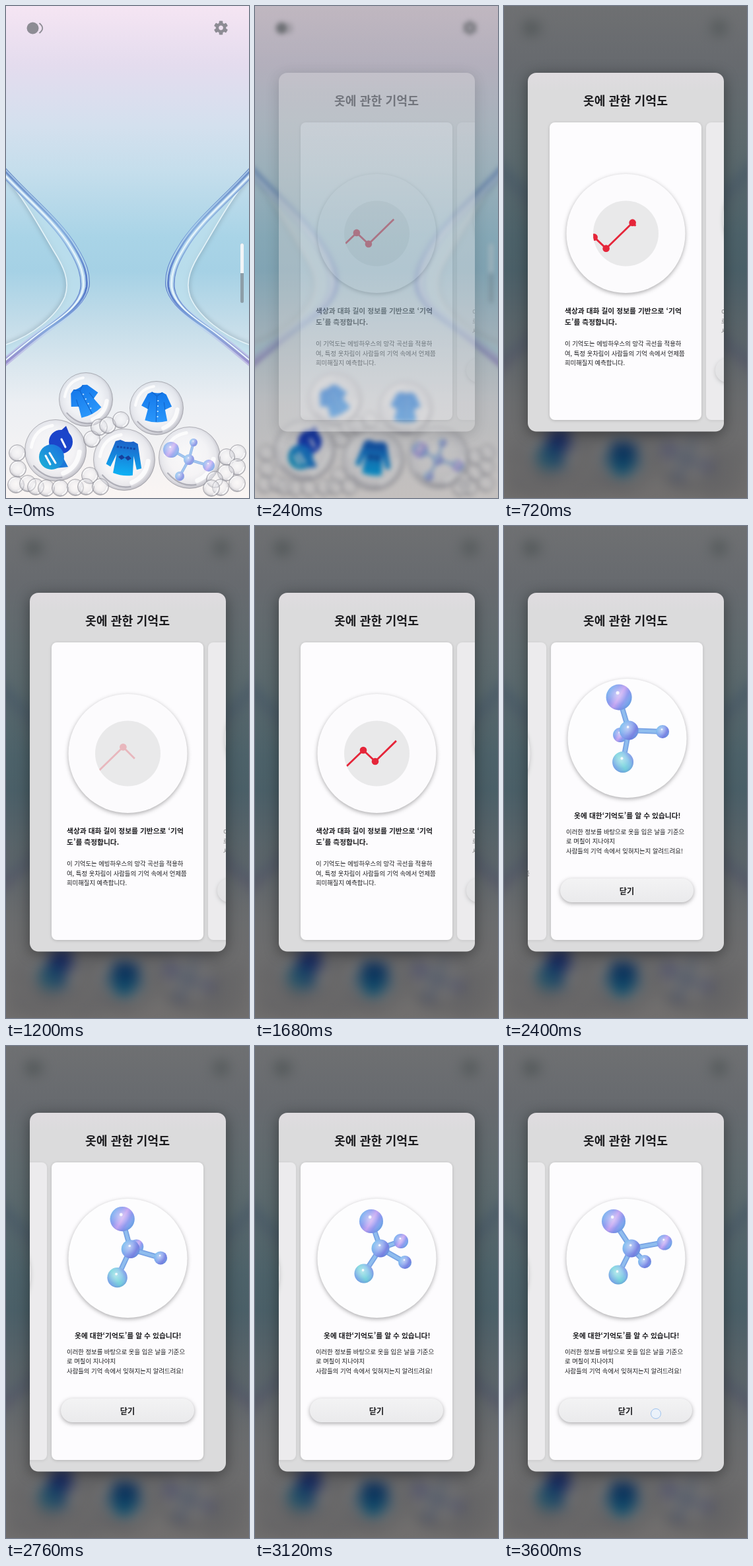
Write an HTML page that moves like this. It is 368 by 744 pixels and loops after 3.72 s.

```html
<!DOCTYPE html>
<html lang="ko">
<head>
<meta charset="utf-8">
<style>
html, body { margin: 0; width: 100%; height: 100%; overflow: hidden; }
#stage {
  position: relative; width: 368px; height: 744px; overflow: hidden;
  background: linear-gradient(#f5e5f3 0, #e4dcee 90px, #d4e0ee 180px, #c5deec 250px, #a9d4e7 350px,
    #a5d1e5 400px, #c2dce9 475px, #d9e6ee 540px, #eceff3 600px, #faf5f3 744px);
}
#stage > * { position: absolute; left: 0; top: 0; width: 368px; height: 744px; }
#scene { overflow: visible; }
#shade { background: linear-gradient(#001008, #000 60%); }
text { font-family: "Noto Sans CJK KR", "Noto Sans CJK", "Noto Sans KR", sans-serif; fill: #1b1b1e; }
.title { font-size: 18.3px; font-weight: 700; text-anchor: middle; }
.lead { font-size: 10.75px; font-weight: 700; }
.body { font-size: 9.35px; }
.btn { font-size: 12.2px; font-weight: 700; text-anchor: middle; }
.soft { filter: drop-shadow(0 1px 2px rgba(0,0,0,.18)); }
.raised { filter: drop-shadow(0 2px 3px rgba(0,0,0,.32)); }
.panel { filter: drop-shadow(0 4px 11px rgba(0,0,0,.4)); }
</style>
</head>
<body>
<div id="stage">
<svg id="scene" viewBox="0 0 368 744">
  <defs>
    <radialGradient id="bigBubble" cx=".48" cy=".47" r=".53">
      <stop offset="0" stop-color="#fff" stop-opacity=".5"/>
      <stop offset=".6" stop-color="#f4f4f8" stop-opacity=".5"/>
      <stop offset=".84" stop-color="#dfe0e7" stop-opacity=".6"/>
      <stop offset="1" stop-color="#aeaeb8" stop-opacity=".75"/>
    </radialGradient>
    <radialGradient id="smallBubble" cx=".5" cy=".45" r=".55">
      <stop offset="0" stop-color="#fff" stop-opacity=".35"/>
      <stop offset=".55" stop-color="#e9e9ee" stop-opacity=".4"/>
      <stop offset=".85" stop-color="#bdbdc5" stop-opacity=".5"/>
      <stop offset="1" stop-color="#84848e" stop-opacity=".6"/>
    </radialGradient>
    <linearGradient id="rim" x1="0" y1="246" x2="0" y2="545" gradientUnits="userSpaceOnUse">
      <stop offset="0" stop-color="#6d8fc8"/><stop offset=".3" stop-color="#86aede"/>
      <stop offset=".6" stop-color="#5577c8"/><stop offset=".8" stop-color="#86aadd"/>
      <stop offset="1" stop-color="#9a8bcb"/>
    </linearGradient>
    <linearGradient id="band" x1="0" y1="246" x2="0" y2="545" gradientUnits="userSpaceOnUse">
      <stop offset="0" stop-color="#a9c6ea"/><stop offset=".45" stop-color="#b5d8ee"/>
      <stop offset=".8" stop-color="#bfd6ef"/><stop offset="1" stop-color="#b9afe0"/>
    </linearGradient>
    <linearGradient id="shirtFill" x1="0" y1="0" x2="0" y2="1">
      <stop offset="0" stop-color="#1478ea"/><stop offset="1" stop-color="#2a97fb"/>
    </linearGradient>
    <linearGradient id="knitFill" x1="0" y1="-25" x2="0" y2="26" gradientUnits="userSpaceOnUse">
      <stop offset="0" stop-color="#1c62c8"/><stop offset="1" stop-color="#0fb0f4"/>
    </linearGradient>
    <linearGradient id="chatFill" x1="0" y1="1" x2="1" y2="0">
      <stop offset="0" stop-color="#1db4d6"/><stop offset="1" stop-color="#1c6de0"/>
    </linearGradient>
    <path id="edge" d="M-30 222L0 246C40 290 85 325 108 365C122 388 128 405 126 424C122 448 98 466 72 484C45 502 20 525-30 565"/>
    <path id="inner" d="M-30 240L0 260C25 287 50 333 72 370C86 392 98 415 89 440C76 470 40 498 0 512L-30 525"/>
    <g id="glass" fill="none">
      <use href="#inner" stroke="#6f8796" stroke-width="6" opacity=".4" style="filter:blur(3px)"/>
      <path d="M-30 222L0 246C40 290 85 325 108 365C122 388 128 405 126 424C122 448 98 466 72 484C45 502 20 525-30 565V525L0 512C40 498 76 470 89 440C98 415 86 392 72 370C50 333 25 287 0 260L-30 240Z" fill="#bfe1ee" opacity=".75"/>
      <use href="#inner" stroke="#e6f4f9" stroke-width="1.6"/>
      <use href="#edge" x="-7" y="2" stroke="url(#band)" stroke-width="12" opacity=".85"/>
      <use href="#edge" x="-13" y="3" stroke="url(#rim)" stroke-width="1.8" opacity=".75"/>
      <use href="#edge" x="-9" y="2" stroke="#e8f5fc" stroke-width="2.4"/>
      <use href="#edge" x="-4" y="1" stroke="url(#rim)" stroke-width="3"/>
      <use href="#edge" stroke="url(#rim)" stroke-width="1.2"/>
    </g>
    <g id="shirt">
      <path d="M-8-23Q0-20 8-23L14-20L23-2L13 3L17 20Q0 25-17 20L-13 3L-23-2L-14-20Z" fill="url(#shirtFill)"/>
      <path d="M-8-23L0-17L8-23M0-17V22M-13 3L-11-8M13 3L11-8" fill="none" stroke="#1262c8" stroke-width="1"/>
      <path d="M2-11V18" stroke="#bfe2ff" stroke-width="2" stroke-dasharray="2 6"/>
    </g>
  </defs>
  <use href="#glass"/>
  <use href="#glass" transform="translate(368) scale(-1 1)"/>
  <g fill="#8d8c94">
    <circle cx="40.5" cy="33.5" r="9"/>
    <path d="M50.500 26Q60 33.500 50.500 41" fill="none" stroke="#8d8c94" stroke-width="1.800"/>
    <g id="gear" transform="translate(325.5 33)"></g>
  </g>
  <g id="bar">
    <rect x="355" y="359" width="5" height="90" rx="2.5" fill="#8d9ea8"/>
    <path d="M355 404V361.500a2.500 2.500 0 0 1 5 0V404Z" fill="#f2f5f7"/>
  </g>
  <g id="bubbles"></g>
  <use href="#shirt" transform="translate(120 597) rotate(-28)"/>
  <use href="#shirt" transform="translate(228 607) rotate(2)"/>
  <g transform="translate(180 683) rotate(7)">
    <path d="M-10-26Q0-22 10-26L17-23L27 13L20 16L13-4L15 25Q0 29-15 25L-13-4L-20 16L-27 13L-17-23Z" fill="url(#knitFill)"/>
    <path d="M-14-15H14" stroke="#1548a8" stroke-width="3" stroke-dasharray="3 2"/>
    <path d="M-10 0l5-4l5 4l5-4l5 4l-5 4l-5-4l-5 4Z" fill="#173f9c"/>
  </g>
  <g>
    <path d="M81 644L91 635L98 652Z" fill="#1b3fc4"/>
    <circle cx="83" cy="659" r="18" fill="#1b45ca"/>
    <path d="M74 699L94 697L86 682Z" fill="#1c78d8"/>
    <circle cx="69" cy="682" r="19" fill="url(#chatFill)"/>
    <path d="M60 680L67 693M66 676L75 691M84 655L90 667" stroke="#fff" stroke-width="3" stroke-linecap="round"/>
  </g>
  <g id="mini"></g>
</svg>
<div id="shade"></div>
<svg id="modal" viewBox="0 0 368 744">
  <defs>
    <linearGradient id="panelFill" x1="0" y1="0" x2="0" y2="1">
      <stop offset="0" stop-color="#e0dce0"/><stop offset=".05" stop-color="#dbdbdc"/><stop offset="1" stop-color="#dbdbdc"/>
    </linearGradient>
    <linearGradient id="btnFill" x1="0" y1="0" x2="0" y2="1">
      <stop offset="0" stop-color="#f3f3f4"/><stop offset="1" stop-color="#eaeaec"/>
    </linearGradient>
    <linearGradient id="ballA" x1="0" y1=".2" x2="1" y2=".8">
      <stop offset="0" stop-color="#69b4ee"/><stop offset=".3" stop-color="#8e9cf0"/>
      <stop offset=".5" stop-color="#c6a5f2"/><stop offset=".7" stop-color="#8f9af0"/><stop offset="1" stop-color="#72c3ee"/>
    </linearGradient>
    <linearGradient id="ballB" x1="0" y1=".2" x2="1" y2=".8">
      <stop offset="0" stop-color="#72c0ee"/><stop offset=".45" stop-color="#88a4ee"/>
      <stop offset=".75" stop-color="#7a83e2"/><stop offset="1" stop-color="#74b4ec"/>
    </linearGradient>
    <linearGradient id="ballC" x1="0" y1=".8" x2="1" y2=".2">
      <stop offset="0" stop-color="#7d9cec"/><stop offset=".45" stop-color="#78d6dc"/>
      <stop offset=".7" stop-color="#83c6e8"/><stop offset="1" stop-color="#8b96ea"/>
    </linearGradient>
    <radialGradient id="sheen" cx=".42" cy=".38" r=".62">
      <stop offset="0" stop-color="#fff" stop-opacity=".45"/><stop offset=".55" stop-color="#fff" stop-opacity=".1"/>
      <stop offset=".8" stop-color="#4a63c8" stop-opacity=".05"/><stop offset="1" stop-color="#4a63c8" stop-opacity=".3"/>
    </radialGradient>
    <clipPath id="panelClip"><rect x="36" y="101" width="297" height="542.500" rx="13"/></clipPath>
    <clipPath id="dialClip"><circle cx="184.500" cy="344" r="49.500"/></clipPath>
  </defs>
  <rect class="panel" x="36" y="101" width="297" height="542.500" rx="13" fill="url(#panelFill)"/>
  <text class="title" x="184" y="150">옷에 관한 기억도</text>
  <g clip-path="url(#panelClip)">
    <g id="card1">
      <rect class="soft" x="69" y="176" width="230" height="450" rx="8" fill="#fdfcfe"/>
      <circle class="raised" cx="184.500" cy="344" r="90" fill="#fcfbfd"/>
      <circle cx="184.500" cy="344" r="49.500" fill="#e9e9ea"/>
      <g clip-path="url(#dialClip)"><g id="chart" fill="#e5263a">
        <path id="line" d="M0 0L25-24L43-7L83-46L113-16" fill="none" stroke="#e5263a" stroke-width="2.800" stroke-linejoin="round"/>
        <circle cx="25" cy="-24" r="5.300"/><circle cx="43" cy="-7" r="5.300"/><circle cx="83" cy="-46" r="5.300"/>
      </g></g>
      <g class="lead"><text x="92" y="465">색상과 대화 길이 정보를 기반으로 ‘기억</text><text x="92" y="482">도’를 측정합니다.</text></g>
      <g class="body">
        <text x="92" y="514">이 기억도는 에빙하우스의 망각 곡선을 적용하</text>
        <text x="92" y="528.500">여, 특정 옷차림이 사람들의 기억 속에서 언제쯤</text>
        <text x="92" y="543">희미해질지 예측합니다.</text>
      </g>
    </g>
    <g id="card2">
      <rect class="soft" x="69" y="176" width="230" height="450" rx="8" fill="#fdfcfe"/>
      <circle class="raised" cx="184.500" cy="321" r="90" fill="#fdfdfe"/>
      <g id="molecule"></g>
      <text class="lead" x="104" y="442">옷에 대한‘기억도’를 알 수 있습니다!</text>
      <g class="body">
        <text x="92" y="465.500">이러한 정보를 바탕으로 옷을 입은 날을 기준으</text>
        <text x="92" y="480">로 며칠이 지나야지</text>
        <text x="92" y="494.500">사람들의 기억 속에서 잊혀지는지 알려드려요!</text>
      </g>
      <rect class="raised" x="83" y="533" width="202" height="36" rx="18" fill="url(#btnFill)"/>
      <text class="btn" x="184" y="556.500">닫기</text>
    </g>
  </g>
  <circle id="touch" r="7.500" fill="#eaf3ff" fill-opacity=".7" stroke="#9fc3ee"/>
</svg>
</div>
<script>
const LOOP = 3720, STEP = 120, PITCH = 237;
const $ = id => document.getElementById(id);
const clamp = v => Math.min(1, Math.max(0, v));
const ease = v => { v = clamp(v); return v * v * (3 - 2 * v); };

// Piecewise linear value from [time, value] pairs
function lerp(keys, t) {
  let i = 0;
  while (i < keys.length - 2 && t > keys[i + 1][0]) i++;
  const [a, x] = keys[i], [b, y] = keys[i + 1];
  return x + (y - x) * clamp((t - a) / (b - a));
}

// Smooth curve through [time, ...values] rows
function spline(keys, t) {
  const last = keys.length - 1;
  let i = 0;
  while (i < last - 1 && t > keys[i + 1][0]) i++;
  const slope = (k, c) => {
    const p = keys[Math.max(0, k - 1)], q = keys[Math.min(last, k + 1)];
    return (q[c] - p[c]) / (q[0] - p[0]);
  };
  const a = keys[i], b = keys[i + 1], h = b[0] - a[0];
  const u = Math.max(0, (t - a[0]) / h), u2 = u * u, u3 = u2 * u;
  return a.slice(1).map((v, j) => v * (2 * u3 - 3 * u2 + 1) + b[j + 1] * (3 * u2 - 2 * u3)
    + slope(i, j + 1) * h * (u3 - 2 * u2 + u) + slope(i + 1, j + 1) * h * (u3 - u2));
}

const ball = (x, y, r, fill) =>
  `<circle cx="${x}" cy="${y}" r="${r}" fill="url(#ball${fill})"/>
   <circle cx="${x}" cy="${y}" r="${r}" fill="url(#sheen)"/>
   <circle cx="${x - r * .1}" cy="${y - r * .35}" r="${r * .13}" fill="#fff" opacity=".85"/>`;

// Balls are [x, y, r, fill]; the first one drawn sits behind the hub
function drawMolecule(el, hub, balls, w) {
  const line = ([x, y], color, width) =>
    `<path d="M${hub[0]} ${hub[1]}L${x} ${y}" stroke="${color}" stroke-width="${width}"/>`;
  const bond = b => line(b, '#78a3e4', w) + line(b, '#8fbdee', w * .55);
  const [back, ...rest] = balls;
  el.innerHTML = bond(back) + ball(...back) + rest.map(bond).join('') + ball(...hub) + rest.map(b => ball(...b)).join('');
}

const poses = {
  hub: [[2040, 184, 313, 16], [2400, 187, 309, 14.5], [3120, 190, 306, 13.5], [3600, 193, 306, 13.5]],
  back: [[2040, 160, 338, 13], [2400, 174, 316, 11], [3120, 221, 295, 11], [3600, 243, 297, 11.5]],
  top: [[2040, 156, 265, 21], [2400, 172, 259, 19.5], [3120, 176, 265, 18], [3600, 166, 265, 18]],
  base: [[2040, 205, 358, 17], [2400, 178, 357, 16], [3120, 165, 344, 14.5], [3600, 173, 346, 14.5]],
  front: [[2040, 231, 297, 10], [2400, 238, 311, 10], [3120, 227, 327, 10], [3600, 213, 326, 10]]
};

function buildScene() {
  let teeth = '';
  for (let i = 0; i < 6; i++) teeth += `<rect x="-2.8" y="-10.5" width="5.6" height="6" rx="1" transform="rotate(${i * 60})"/>`;
  $('gear').innerHTML = teeth + '<circle r="5.6" fill="none" stroke="#8d8c94" stroke-width="4.4"/>';

  const big = [[121, 595, 41], [228, 608, 41], [75, 672, 47], [179, 686, 47], [278, 683, 47]];
  const small = [[17, 676], [18, 700], [15, 724], [33, 722], [45, 727], [61, 729], [82, 729], [105, 728], [127, 710], [121, 727],
    [143, 727], [130, 655], [141, 637], [154, 634], [174, 626],
    [351, 676], [334, 682], [350, 697], [333, 706], [316, 716], [350, 722], [325, 728], [311, 729]];
  const arc = (d, color, width) =>
    `<path d="${d}" fill="none" stroke="${color}" stroke-width="${width}" stroke-linecap="round" opacity=".8"/>`;
  const bubble = fill => ([x, y, r = 13]) =>
    `<circle cx="${x}" cy="${y}" r="${r - .5}" fill="url(#${fill})" stroke="#77777f" stroke-opacity=".55" stroke-width=".9"/>`
    + arc(`M${x - r * .78} ${y - r * .1}Q${x - r * .68} ${y - r * .7} ${x - r * .1} ${y - r * .8}`, '#fff', r * .1)
    + arc(`M${x + r * .25} ${y + r * .74}Q${x + r * .7} ${y + r * .55} ${x + r * .77} ${y + r * .05}`, '#fff', r * .15)
    + arc(`M${x - r * .7} ${y + r * .5}Q${x - r * .3} ${y + r * .95} ${x + r * .2} ${y + r * .87}`, '#a3a3ad', r * .05);
  $('bubbles').innerHTML = big.map(bubble('bigBubble')).join('') + small.map(bubble('smallBubble')).join('');
  drawMolecule($('mini'), [277, 686, 8, 'B'], [[284, 660, 6, 'B'], [250, 671, 12, 'A'], [263, 711, 7, 'B'], [307, 695, 9, 'A']], 4);
  $('mini').setAttribute('opacity', .8);
}

function drawChart(t) {
  const phase = t < 1260 ? t + 1720 : t;
  const moved = (phase - 1680) / 1000;
  const length = lerp([[1260, 0], [1680, 104], [2040, 115.5], [2440, 122], [2720, 140]], phase);
  const chart = $('chart');
  chart.setAttribute('transform', `translate(${139 - 36 * moved} ${363 + 14 * moved})`);
  chart.setAttribute('opacity', 1 - clamp((phase - 2800) / 160));
  $('line').setAttribute('stroke-dasharray', `${length} 400`);
  const joints = [34.7, 59.4, 115.3];
  chart.querySelectorAll('circle').forEach((c, i) => c.setAttribute('r', 5.3 * clamp((length - joints[i]) / 3)));
}

function drawTouch(t, shift) {
  const swipe = t >= 1920 && t < 2160, tap = t >= 3480;
  const touch = $('touch');
  touch.setAttribute('visibility', swipe || tap ? 'visible' : 'hidden');
  touch.setAttribute('cx', tap ? 230 : 308 - shift);
  touch.setAttribute('cy', tap ? 556 : 503);
}

function render(t) {
  const open = t < STEP ? 0 : ease((t - 60) / 420);
  $('scene').style.filter = open ? `blur(${10 * open}px)` : 'none';
  $('bar').setAttribute('opacity', 1 - open);
  $('shade').style.opacity = .55 * open;
  $('modal').style.opacity = open;

  const shift = t < 1920 ? 0 : t < 2040 ? 20 : PITCH - 114 * Math.exp(-(t - 2040) / 90);
  const turn = clamp(shift / PITCH * 2);
  [['card1', -shift, 1 - .5 * turn], ['card2', PITCH - shift, .5 + .5 * turn]].forEach(([id, x, o]) => {
    $(id).setAttribute('transform', `translate(${x})`);
    $(id).setAttribute('opacity', o);
  });

  drawChart(t);
  const at = name => spline(poses[name], t);
  drawMolecule($('molecule'), [...at('hub'), 'B'],
    [[...at('back'), 'A'], [...at('top'), 'A'], [...at('base'), 'C'], [...at('front'), 'B']], 8);
  drawTouch(t, shift);
}

buildScene();
const start = performance.now();
let shown = -1;
function tick() {
  const t = Math.floor((performance.now() - start) % LOOP / STEP) * STEP;
  if (t !== shown) render(shown = t);
  requestAnimationFrame(tick);
}
tick();
</script>
</body>
</html>
```
